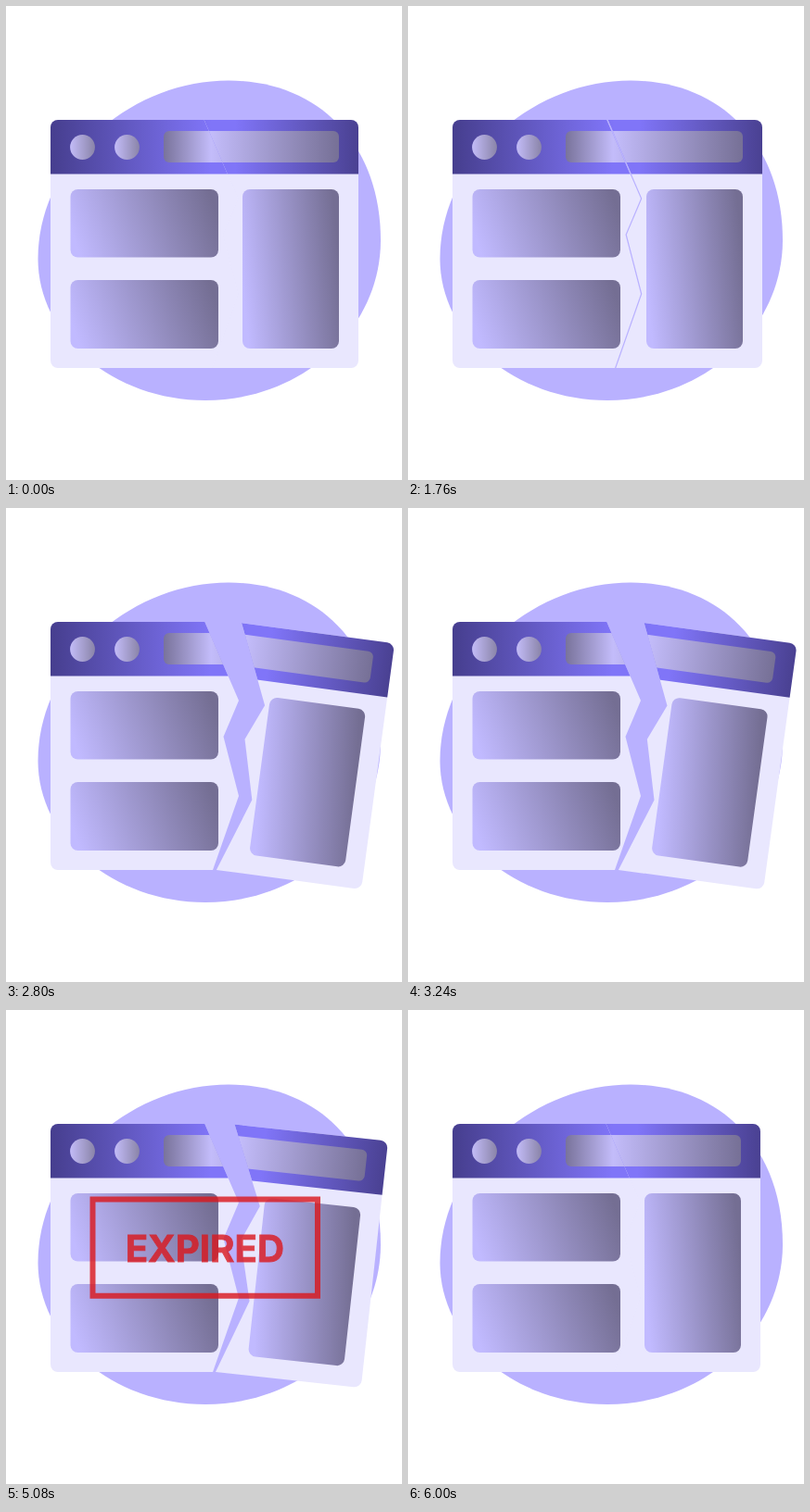
Recreate the animation shown at these times as an HTML page. Size 427 by 512 pixels, loop 6.04 s.

```html
<!DOCTYPE html>
<html lang="en">
<head>
<meta charset="utf-8">
<title>Expired</title>
<style>
  html, body { margin: 0; width: 100%; height: 100%; overflow: hidden; background: #fff; }
  svg { display: block; width: 100%; height: 100%; }
  text { font: 700 40.2px Inter, Roboto, sans-serif; }
</style>
</head>
<body>
<svg viewBox="0 0 427 512">
  <defs>
    <linearGradient id="head">
      <stop offset="0" stop-color="#463e8e"/>
      <stop offset=".52" stop-color="#8075f8"/>
      <stop offset=".6" stop-color="#8075f8"/>
      <stop offset="1" stop-color="#4a4192"/>
    </linearGradient>
    <linearGradient id="bar">
      <stop offset="0" stop-color="#79739b"/>
      <stop offset=".27" stop-color="#c3bcfa"/>
      <stop offset="1" stop-color="#767096"/>
    </linearGradient>
    <linearGradient id="dot">
      <stop offset="0" stop-color="#c3bcf8"/>
      <stop offset="1" stop-color="#8a84a8"/>
    </linearGradient>
    <linearGradient id="card" x1="0" y1=".58" x2="1" y2=".42">
      <stop offset="0" stop-color="#c1baff"/>
      <stop offset="1" stop-color="#746e93"/>
    </linearGradient>
    <clipPath id="leftClip"><path d="M213 120L251 208L234.500 247L251 311L221.600 395H40V120Z"/></clipPath>
    <!-- The right half reaches slightly under the crack, so the closed window has no seam. -->
    <clipPath id="rightClip"><path transform="translate(-.7 0)" d="M213 120L251 208L234.500 247L251 311L221.600 395H390V120Z"/></clipPath>
    <g id="window">
      <rect x="48" y="123" width="332" height="268" rx="8" fill="#e9e7fe"/>
      <path d="M48 181.500V131a8 8 0 0 1 8-8H372a8 8 0 0 1 8 8V181.500Z" fill="url(#head)"/>
      <g fill="url(#dot)">
        <circle cx="82.500" cy="152.500" r="13.400"/>
        <circle cx="130.500" cy="152.500" r="13.400"/>
      </g>
      <rect x="170" y="135" width="189" height="34" rx="6" fill="url(#bar)"/>
      <g fill="url(#card)">
        <rect x="69.500" y="198" width="159.500" height="73.500" rx="8"/>
        <rect x="69.500" y="296" width="159.500" height="74" rx="8"/>
        <rect x="255" y="198" width="104" height="172" rx="8"/>
      </g>
    </g>
  </defs>

  <path fill="#b9b1ff" d="M240 80.500C338 80.500 404 150 404 253C404 349 319 426 215 426C116 426 34.500 357 34.500 273C34.500 168 133 80.500 240 80.500Z"/>
  <g clip-path="url(#leftClip)"><use href="#window"/></g>
  <g id="right"><g clip-path="url(#rightClip)"><use href="#window"/></g></g>
  <g id="stamp">
    <rect x="93.500" y="204.500" width="242.500" height="104.250" fill="none" stroke="#db171c" stroke-width="6"/>
    <text x="214.300" y="272.400" text-anchor="middle" fill="#db171c" stroke="#db171c" stroke-width=".8">EXPIRED</text>
  </g>
</svg>
<script>
const LOOP = 6040, TICK = 40;
const START = { crack: 810, open: 2236, stamp: 3290, close: 5052 };
const CRACK_X = 2, OPEN_X = 4.6, OPEN_ANGLE = 7.8;
const $ = id => document.getElementById(id);
const clamp = v => Math.min(1, Math.max(0, v));

// Damped spring from 0 to 1: mass 1, stiffness 600, damping 15.
function spring(ms) {
  if (ms <= 0) return 0;
  const s = ms / 1000, decay = 7.5, w = Math.sqrt(600 - decay * decay);
  return 1 - Math.exp(-decay * s) * (Math.cos(w * s) + decay / w * Math.sin(w * s));
}

function render(t) {
  const p = Object.fromEntries(Object.entries(START).map(([k, at]) => [k, spring(t - at)]));
  const back = 1 - p.close;
  const dx = (CRACK_X * p.crack + (OPEN_X - CRACK_X) * p.open) * back;
  const angle = OPEN_ANGLE * p.open * back;

  $("right").setAttribute("transform", `translate(${dx} 0) rotate(${angle} 223 391)`);
  $("stamp").setAttribute("opacity", clamp(p.stamp) * clamp(back));
}

const begin = performance.now();
function frame() {
  const t = (performance.now() - begin) % LOOP;
  render(Math.floor(t / TICK) * TICK);
  requestAnimationFrame(frame);
}
frame();
</script>
</body>
</html>
```
